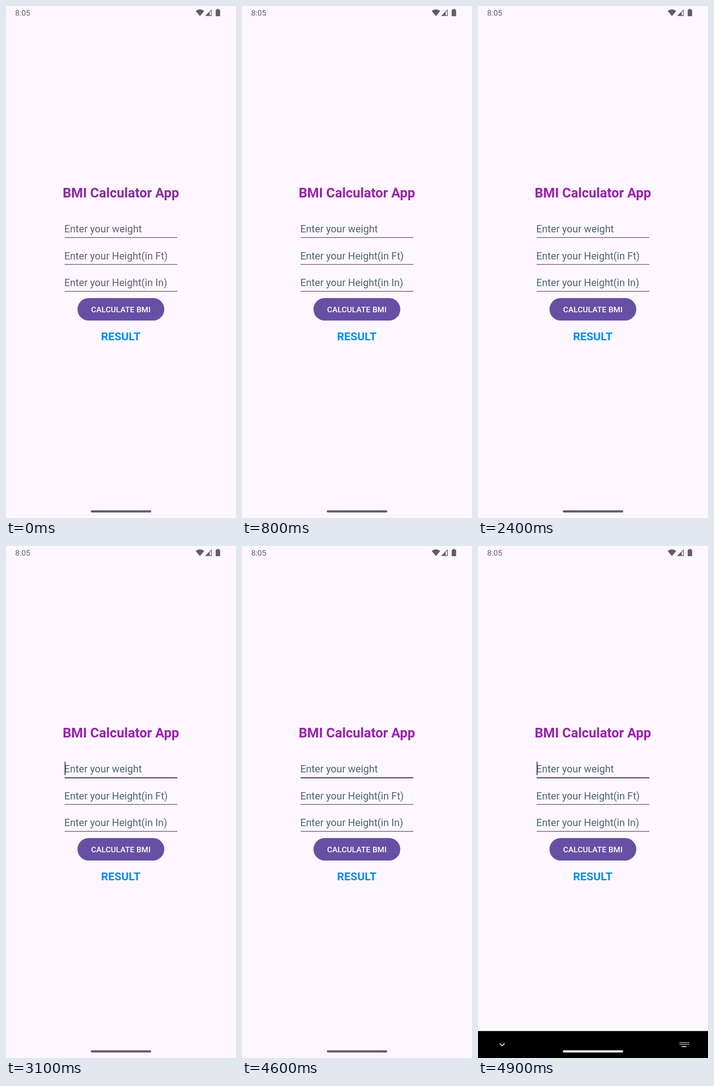
Write an HTML page that moves like this. It is 502 px wide and 1115 px high and loops after 5 s.

```html
<!DOCTYPE html>
<html lang="en">
<head>
<meta charset="utf-8">
<title>BMI Calculator App</title>
<style>
  html, body { margin: 0; width: 100%; height: 100%; overflow: hidden; background: #fef7ff; }
  svg { display: block; width: 100%; height: 100%; font-family: Roboto, sans-serif; }
  .icons { fill: #5f5d66; }
  .hint { font-size: 21.98px; fill: var(--hint); }
  .title { font-size: 29.3px; font-weight: 700; fill: var(--title); }
  .rule { fill: #4b4751; }
</style>
</head>
<body>
<svg viewBox="0 0 502 1115">
  <rect width="502" height="1115" fill="#fef7ff"/>

  <g class="icons">
    <text x="20" y="20.8" font-size="17.1">8:05</text>
    <path d="M414 10.8Q423.2 3.6 432.6 10.8L423.3 22Z"/>
    <path d="M449 7V21.7H434.5ZM447.6 10.3L444.5 13.4V20.3H447.6Z" fill-rule="evenodd"/>
    <path d="M460.3 8V6.5H464.6V8H466Q467.3 8 467.3 9.3V21Q467.3 22.3 466 22.3H459Q457.7 22.3 457.7 21V9.3Q457.7 8 459 8Z"/>
  </g>

  <text class="title" x="250.7" y="416.8" text-anchor="middle">BMI Calculator App</text>

  <text class="hint" x="127.2" y="493.2">Enter your weight</text>
  <text class="hint" x="127.2" y="551.8">Enter your Height(in Ft)</text>
  <text class="hint" x="127.2" y="610.4">Enter your Height(in In)</text>
  <rect class="rule" id="weightRule" x="128" y="503.6" width="246" height="1.3"/>
  <rect class="rule" x="128" y="562.1" width="246" height="1.3"/>
  <rect class="rule" x="128" y="620.8" width="246" height="1.3"/>
  <rect id="cursor" x="127.7" y="470" width="2.4" height="29" fill="#5a5070"/>

  <rect x="156" y="636" width="189.5" height="49" rx="24.5" fill="#6750a4"/>
  <text x="250.7" y="667.1" text-anchor="middle" font-size="17.1" font-weight="500"
        letter-spacing=".12" fill="#fff">CALCULATE BMI</text>
  <text x="250.5" y="728" text-anchor="middle" font-size="24.4" font-weight="700" fill="#078cf6">RESULT</text>

  <g id="keyboardBar">
    <rect y="1056.3" width="502" height="120"/>
    <path d="M47.3 1083.2L52.7 1088.6L58.1 1083.2" fill="none" stroke="#fff" stroke-width="1.8"/>
    <path d="M440.4 1081.6H460M440.4 1085.6H460" stroke="#fff" stroke-width="2" stroke-dasharray="2 1.5"/>
    <path d="M444.5 1090.2H455" stroke="#fff" stroke-width="1.8"/>
  </g>
  <rect id="handle" x="185" y="1098.3" width="132" height="4.6" rx="2.3"/>
</svg>
<script>
  const LOOP = 5000, SETTLE = 200, FOCUS = 2700, BLINK = 500, BAR_IN = 4600, BAR_TIME = 200;
  const byId = id => document.getElementById(id);
  const [weightRule, cursor, keyboardBar, handle] =
    ['weightRule', 'cursor', 'keyboardBar', 'handle'].map(byId);
  const clamp = x => Math.max(0, Math.min(1, x));
  const mix = (a, b, p) => a + (b - a) * p;

  // The handle darkens under the rising bar, then turns white.
  function handleColor(t) {
    const dark = clamp((t - BAR_IN) / 100), light = clamp((t - BAR_IN - 100) / 200);
    const rgb = [96, 93, 102].map(c => Math.round(mix(mix(c, 49, dark), 255, light)));
    return `rgb(${rgb})`;
  }

  function draw(t) {
    const colors = document.documentElement.style;
    colors.setProperty('--title', t < SETTLE ? '#8b2ba3' : '#9b20b1');
    colors.setProperty('--hint', t < SETTLE ? '#645f6d' : '#4c666f');

    const focused = t >= FOCUS;
    weightRule.setAttribute('height', focused ? 2.4 : 1.3);
    const cursorOn = focused && Math.floor((t - FOCUS) / BLINK) % 2 === 0;
    cursor.setAttribute('visibility', cursorOn ? 'visible' : 'hidden');

    const shown = clamp((t - BAR_IN) / BAR_TIME);
    keyboardBar.setAttribute('opacity', shown);
    keyboardBar.setAttribute('transform', `translate(0 ${50 * (1 - shown)})`);
    handle.setAttribute('fill', handleColor(t));
  }

  const start = performance.now();
  function tick() {
    draw((performance.now() - start) % LOOP);
    requestAnimationFrame(tick);
  }
  tick();
</script>
</body>
</html>
```
